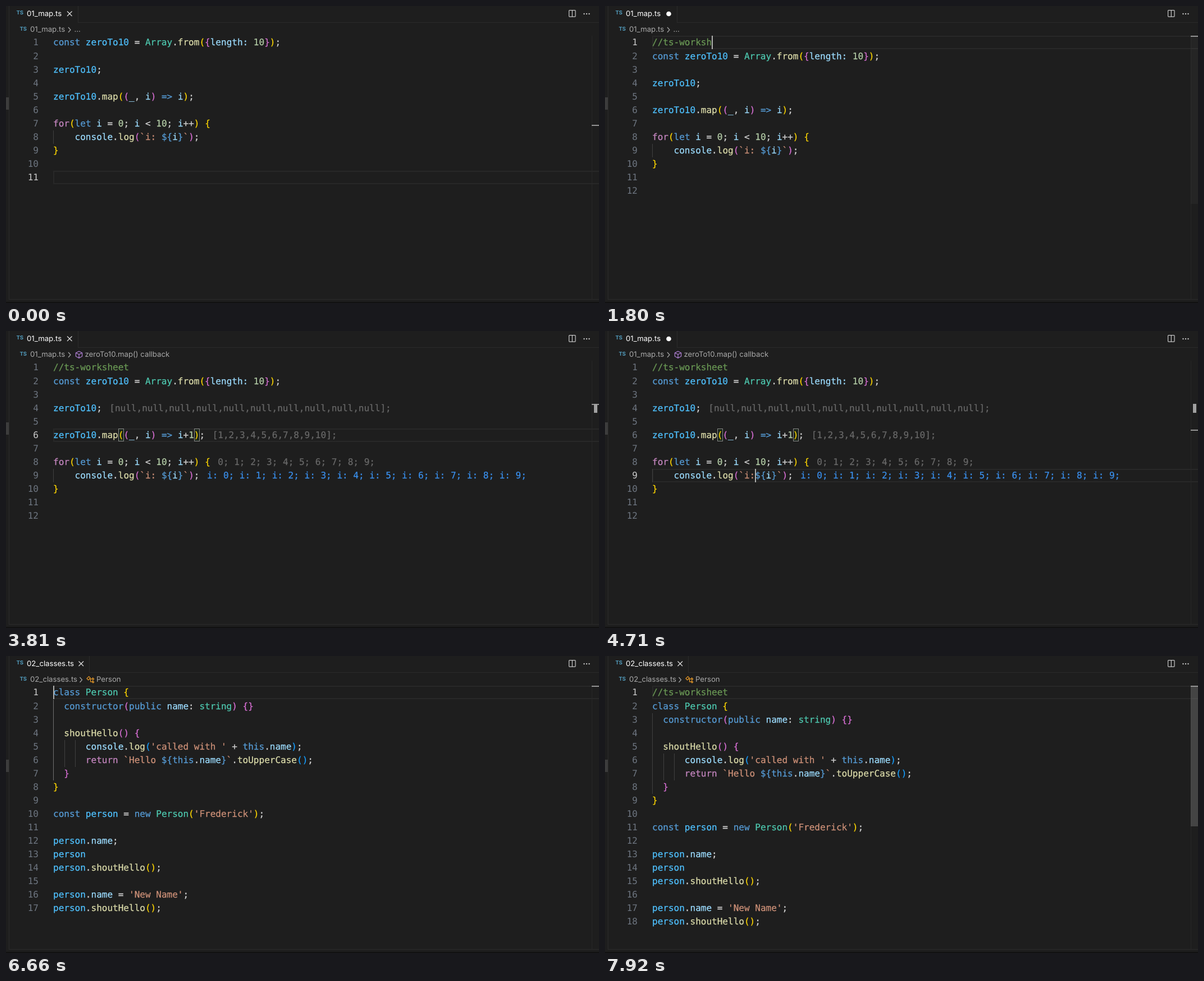
An HTML page that plays this animation: 1056 by 530 pixels, repeating every 8000 ms.

```html
<!DOCTYPE html>
<html lang="en">
<head>
<meta charset="utf-8">
<title>Worksheet editor</title>
<style>
html, body { margin: 0; width: 100%; height: 100%; overflow: hidden; background: #1e1e1e; }
#stage { position: relative; width: 1056px; height: 530px; overflow: hidden; background: #1e1e1e; text-rendering: geometricPrecision; }
#stage div { position: absolute; white-space: pre; box-sizing: border-box; }
.edge { background: #2b2b2b; }
.ui { font: 13.2px/16px Inter, "Open Sans", sans-serif; color: #a9a9a9; }
.badge { font: bold 9.5px/16px Inter, sans-serif; color: #519aba; }
.line, .num { font: 16.02px/24px "DejaVu Sans Mono", "Liberation Mono", monospace; height: 24px; }
.num { left: 18px; width: 40px; text-align: right; color: #6e7681; }
.num.on { color: #cccccc; }
.line { left: 84px; -webkit-text-stroke: .25px; }
.note { margin-left: 13.5px; }
.row { left: 84px; width: 974px; height: 24px; border: 2px solid #282828; }
.guide { width: 1px; background: #404040; }
.pair { height: 23px; border: 1px solid #888; background: rgba(0, 100, 0, .1); }
.caret { width: 2px; height: 24px; background: #aeafad; }
.thumb { left: 1043px; top: 53px; width: 13px; background: #797979; }
.mark { left: 1043px; width: 13px; height: 2px; background: #949494; }
.bar { left: 1047px; width: 6px; height: 16px; background: #a0a0a0; }
svg { position: absolute; left: 0; top: 0; fill: none; stroke-width: 1.2; }
</style>
</head>
<body>
<div id="stage">
  <div class="edge" style="left:5px;top:0;width:1px;height:524px"></div>
  <div class="edge" style="left:5px;top:523px;width:1051px;height:1px"></div>
  <div style="left:0;top:528px;width:1056px;height:2px;background:#111"></div>
  <div style="left:1043px;top:53px;width:1px;height:470px;background:#272727"></div>
  <svg width="1056" height="50" stroke="#c5c5c5">
    <rect x="1002.6" y="7.6" width="11.5" height="11.5" rx="1"/>
    <path d="M1008.4 7.6v11.5"/>
    <g fill="#c5c5c5" stroke="none">
      <circle cx="1029.5" cy="14" r="1.2"/><circle cx="1034" cy="14" r="1.2"/><circle cx="1038.5" cy="14" r="1.2"/>
    </g>
  </svg>
  <div id="view" style="left:0;top:0"></div>
</div>
<script>
const LOOP = 8000, CH = 9.645, LH = 24.06, LEFT = 84, TOP = 53.45;
const SWITCH = 6090, RULER = 470, VISIBLE = 19.5;
const HEADER = "//ts-worksheet";

const COLORS = {
  k: "#569cd6", f: "#c586c0", v: "#9cdcfe", c: "#4fc1ff", t: "#4ec9b0", m: "#dcdcaa",
  n: "#b5cea8", s: "#ce9178", g: "#6a9955", p: "#d4d4d4", 1: "#ffd700", 2: "#da70d6",
  3: "#179fff", a: "#686868", b: "#3a90ee"
};

// "~x" switches to colour x, "@" marks the edited spot
const LOOP_CODE = [
  "~kconst ~czeroTo10~p = ~tArray~p.~mfrom~1(~2{~vlength: ~n10~2}~1)~p;",
  "",
  "~czeroTo10~p;",
  "",
  "~czeroTo10~p.~mmap~1(~2(~v_~p, ~vi~2)~k => ~vi@~1)~p;",
  "",
  "~ffor~1(~klet ~vi~p = ~n0~p; ~vi~p < ~n10~p; ~vi~p++~1) {",
  "    ~vconsole~p.~mlog~2(~s`i:@~k${~vi~k}~s`~2)~p;",
  "~1}",
  "",
  ""
];
const CLASS_CODE = [
  "~kclass ~tPerson ~1{",
  "  ~kconstructor~2(~kpublic ~vname~p: ~tstring~2) {}",
  "",
  "  ~mshoutHello~2() {",
  "      ~vconsole~p.~mlog~3(~s'called with '~p + ~kthis~p.~vname~3)~p;",
  "      ~freturn ~s`Hello ~k${this~p.~vname~k}~s`~p.~mtoUpperCase~3()~p;",
  "  ~2}",
  "~1}",
  "",
  "~kconst ~cperson~p = ~knew ~tPerson~1(~s'Frederick'~1)~p;",
  "",
  "~cperson~p.~vname~p;",
  "~cperson",
  "~cperson~p.~mshoutHello~1()~p;",
  "",
  "~cperson~p.~vname~p = ~s'New Name'~p;",
  "~cperson~p.~mshoutHello~1()~p;"
];

// Caret positions: [time, line, column]
const moves = [[0, 11, 0]];
const run = (start, step, count, place) => {
  for (let i = 0; i < count; i++) moves.push([start + step * i, ...place(i)]);
};
run(510, 30, 10, i => [10 - i, 0]);
moves.push([900, 2, 0], [1020, 1, 0]);
run(1230, 36, 7, i => [1, i + 1]);
run(1680, 36, 7, i => [1, i + 8]);
run(2580, 30, 5, i => [i + 2, [14, 0, 9, 0, 14][i]]);
run(2730, 16, 10, i => [6, 15 + i]);
moves.push([2910, 6, 25], [2950, 6, 26]);
run(3960, 90, 3, i => [7 + i, i ? 26 : 0]);
run(4260, 60, 6, i => [9, 25 - i]);
moves.push([4680, 9, 19], [SWITCH, 1, 0], [6720, 1, 0], [7200, 2, 0], [7260, 1, 0]);
run(7410, 30, 4, i => [1, i + 1]);
run(7680, 18, 10, i => [1, i + 5]);

const within = (t, ...spans) => spans.some(([a, b]) => t >= a && t < b);
const clamp = x => Math.max(0, Math.min(1, x));
const lineTop = n => Math.round(TOP + LH * (n - 1));
const colX = c => LEFT + c * CH;
const esc = s => s.replace(/&/g, "&amp;").replace(/</g, "&lt;").replace(/>/g, "&gt;");
const paint = code => code.split("~").map((s, i) =>
  i ? `<span style="color:${COLORS[s[0]]}">${esc(s.slice(1))}</span>` : s).join("");
const box = (cls, css, text = "") => `<div class="${cls}" style="${css}">${text}</div>`;
const list = (from, map, sep) => Array.from({ length: 10 }, (_, i) => map(i + from)).join(sep);

function notes(t) {
  if (!within(t, [2240, SWITCH])) return {};
  const gap = t < 5400 ? " " : "";
  return {
    4: "~a[" + list(0, () => "null", ",") + "];",
    6: "~a[" + list(t < 3600 ? 0 : 1, i => i, ",") + "];",
    8: "~a" + list(0, i => i + ";", " "),
    9: "~b" + list(0, i => `i:${gap}${i};`, " ")
  };
}

function bodyLines(t) {
  const second = t >= SWITCH;
  const lines = (second ? CLASS_CODE : LOOP_CODE).slice();
  if (!second) {
    lines[4] = lines[4].replace("@", t < 2910 ? "" : t < 2950 ? "~p+" : "~p+~n1");
    lines[7] = lines[7].replace("@", t < 4680 ? " " : "");
  }
  const from = second ? 7200 : 900;
  if (t >= from) {
    const typed = moves.filter(m => m[0] > from && m[0] <= t && m[1] === 1).pop();
    lines.unshift("~g" + HEADER.slice(0, typed ? typed[2] : 0));
  }
  return lines;
}

function header(t, second) {
  const name = second ? "02_classes.ts" : "01_map.ts";
  const shift = second ? 20.5 : 0, x = 113 + shift;
  const dirty = within(t, [900, 2200], [2910, 3450], [4680, 5000], [7200, 7870]);
  const callback = within(t, [3150, 4900]), person = t >= 6450;
  const label = person ? "Person" : callback ? "zeroTo10.map() callback" : "...";
  const labelX = person ? 161 : callback ? 140.5 : 121.5 + shift;
  const close = dirty
    ? `<circle cx="${x + .5}" cy="14" r="4.3" fill="#fff"/>`
    : `<path d="M${x - 4} 9.5l8.5 8.5m0-8.5l-8.5 8.5" stroke="#e0e0e0"/>`;
  const cube = `<path d="M130 36.2l5.6 2.8v6.2l-5.6 3-5.6-3v-6.2zM124.4 39l5.6 2.8 5.6-2.8M130 41.8v6.4" stroke="#b180d7"/>`;
  const klass = `<path d="M144 40.2l3.6-3.6 2.6 2.6-3.6 3.6zM149 41h4M150.5 41v5h2.5M153 40.6l1.6-1.6 2 2-1.6 1.6zM153 46l1.6-1.6 2 2-1.6 1.6z" stroke="#ee9d28"/>`;
  const edge = second ? 148 : 128;
  return box("edge", `left:${edge}px;top:0;width:1px;height:30px`)
    + box("edge", `left:${edge}px;top:29px;width:${1056 - edge}px;height:1px`)
    + box("", `left:0;top:${second ? 185 : 163}px;width:5px;height:22px;background:#3c3c3c`)
    + box("badge", "left:18.5px;top:5px", "TS") + box("badge", "left:24.5px;top:34px", "TS")
    + box("ui", "left:37px;top:6px;color:#fff", name)
    + box("ui", "left:43px;top:34px", name)
    + box("ui", `left:${labelX}px;top:34px`, label)
    + `<svg width="300" height="52">${close}<path d="M${x - 2} 38l4 4.5-4 4.5" stroke="#a9a9a9"/>${person ? klass : callback ? cube : ""}</svg>`;
}

function scene(t) {
  const second = t >= SWITCH;
  const lines = bodyLines(t), side = notes(t);
  const [last, row, col] = moves.filter(m => m[0] <= t).pop();
  const unit = RULER / (VISIBLE + lines.length - 1);
  const ruler = n => Math.round(53 + (n - 1) * unit);
  const guide = (c, a, b, css = "") =>
    box("guide", `left:${colX(c) + .3}px;top:${lineTop(a)}px;height:${lineTop(b + 1) - lineTop(a)}px;${css}`);
  let html = header(t, second) + box("row", `top:${lineTop(row)}px`);

  const d = lines.length - (second ? 17 : 11);
  if (second) {
    html += guide(0, 2 + d, 7 + d, d ? "" : "background:#707070")
      + guide(2, 5 + d, 6 + d) + guide(4, 5 + d, 6 + d);
  } else html += guide(0, 8 + d, 8 + d);

  const pair = (n, c, w = 1) =>
    box("pair", `left:${colX(c)}px;top:${lineTop(n)}px;width:${w * CH + .5}px`);
  let matched = 0;
  if (within(t, [2874, 4800])) {
    matched = 6;
    html += pair(6, 12) + pair(6, t < 2910 ? 24 : t < 2950 ? 25 : 26);
  } else if (within(t, [4800, SWITCH])) {
    matched = 9;
    html += pair(9, 19, 2) + pair(9, 22);
  }

  lines.forEach((code, i) => {
    const n = i + 1, top = `top:${lineTop(n)}px`;
    const note = side[n] ? `<span class="note">${paint(side[n])}</span>` : "";
    html += box(n === row ? "num on" : "num", top, n) + box("line", top, paint(code) + note);
  });

  if (t >= 480 && t < 7900 && (t - last) % 480 < 240)
    html += box("caret", `left:${Math.floor(colX(col))}px;top:${lineTop(row)}px`);

  const fade = t >= 7200 ? 1 : within(t, [900, 1950]) ? 1 - clamp((t - 1230) / 720) : 0;
  html += box("thumb", `height:${VISIBLE * unit}px;opacity:${(fade * .42).toFixed(3)}`)
    + box("mark", `top:${ruler(row)}px`);
  if (matched) html += box("bar", `top:${ruler(matched)}px`);
  return html;
}

const view = document.getElementById("view");
let shown = "";
const begin = performance.now();
function draw() {
  const html = scene((performance.now() - begin) % LOOP);
  if (html !== shown) view.innerHTML = shown = html;
  requestAnimationFrame(draw);
}
draw();
</script>
</body>
</html>
```
